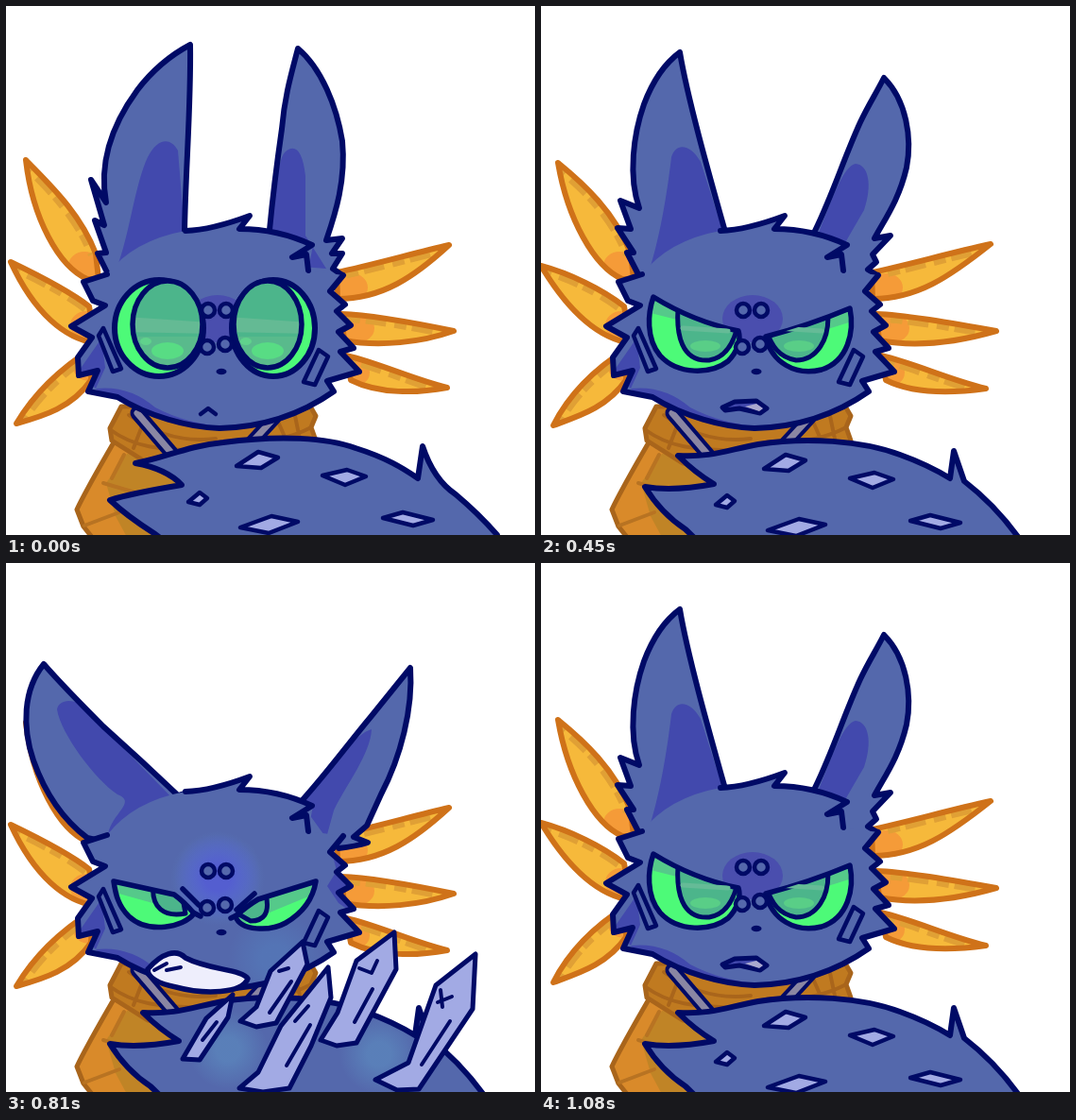
An HTML page with a canvas that plays this animation: 560x560 px, repeating every 1.26 s.

```html
<!DOCTYPE html>
<html lang="en">
<head>
<meta charset="utf-8">
<title>Crystal tail</title>
<style>
html, body { margin: 0; width: 100%; height: 100%; overflow: hidden; background: #fff; }
canvas { display: block; width: 560px; height: 560px; }
</style>
</head>
<body>
<canvas id="stage" width="560" height="560"></canvas>
<script>
const ctx = document.getElementById('stage').getContext('2d');
const NAVY = '#000a66', FUR = '#5468ac', INNER = '#4249ad', GREEN = '#4dfa78',
  LENS = '#4cb58b', CRYSTAL = '#a2aae4', TEETH = '#eeeefc',
  GOLD = '#f6b93b', RUST = '#cf7219', SCARF = '#d98a2a', COLLAR = '#c07a20', THREAD = '#a9651b';

ctx.lineJoin = 'round';
ctx.lineCap = 'round';

function shape(d, fill, stroke, width = 6) {
  const p = new Path2D(d);
  if (fill) { ctx.fillStyle = fill; ctx.fill(p); }
  if (stroke) { ctx.strokeStyle = stroke; ctx.lineWidth = width; ctx.stroke(p); }
}
const line = (d, width = 6, color = NAVY) => shape(d, null, color, width);

function oval(x, y, rx, ry, fill, width) {
  ctx.beginPath();
  ctx.ellipse(x, y, rx, ry, 0, 0, 7);
  if (fill) { ctx.fillStyle = fill; ctx.fill(); }
  if (width) { ctx.strokeStyle = NAVY; ctx.lineWidth = width; ctx.stroke(); }
}
function clipped(d, draw) {
  ctx.save();
  ctx.clip(new Path2D(d));
  draw();
  ctx.restore();
}
function glow(x, y, r, rgb, alpha) {
  const g = ctx.createRadialGradient(x, y, r * .3, x, y, r);
  g.addColorStop(0, `rgba(${rgb},${alpha})`);
  g.addColorStop(1, `rgba(${rgb},0)`);
  oval(x, y, r, r, g);
}

// Each fin: two tip positions, upper edge, base and lower edge, glowing root.
const fins = [
  { tips: ['21 163', '18 166'], top: 'C45 188 78 218 95 262', low: 'L98 289 86 289 C56 276 28 225', root: [83, 275] },
  { tips: ['5 271', '0 275'], top: 'C30 283 65 300 88 318', low: 'L95 357 C62 352 30 325', root: [85, 338] },
  { tips: ['11 442', '13 444'], top: 'C30 410 60 382 92 362', low: 'L90 396 C70 425 40 434', root: [88, 382] },
  { tips: ['469 253', '476 252'], top: 'C430 262 385 275 350 282', low: 'L351 310 C398 310 432 287', root: [366, 298] },
  { tips: ['474 344', '482 344'], top: 'C430 335 385 327 355 326', low: 'L358 354 C395 361 440 356', root: [373, 341] },
  { tips: ['467 404', '471 405'], top: 'C430 395 395 378 360 370', low: 'L365 396 C395 411 435 410', root: [368, 388] }
];
function drawFins(variant, dy) {
  ctx.save();
  ctx.translate(0, dy);
  for (const { tips, top, low, root } of fins) {
    const tip = tips[variant], edge = `M${tip} ${top}`, d = `${edge} ${low} ${tip}Z`;
    shape(d, GOLD);
    clipped(d, () => {
      oval(...root, 17, 15, '#f59b38');
      ctx.setLineDash([13, 9, 22, 6]);
      ctx.lineCap = 'butt';
      line(edge, 17, '#e0a035');
      ctx.setLineDash([]);
    });
    ctx.lineCap = 'round';
    line(d, 6, RUST);
  }
  ctx.restore();
}

function drawScarf() {
  shape('M114 462 C98 490 85 512 75 533 L82 551 94 566 H190 V470Z', SCARF, THREAD, 5);
  shape('M128 474 L106 505 116 540 130 566 H190 V480Z', '#c08426');
  line('M103 505 L140 516 M83 550 L120 536 M125 475 L112 500', 4, '#b87322');
  shape('M122 424 L110 447 112 460 150 484 220 490 310 476 328 460 323 446 328 434 321 422 Z', COLLAR, THREAD, 5);
  line('M111 449 C145 474 185 468 220 472 M130 433 C160 455 190 462 222 458 M323 446 Q290 464 240 461 ' +
    'M306 434 L313 468 M288 440 L302 472 M145 442 L135 468', 4, THREAD);
  for (const d of ['M139 431 L181 480', 'M284 436 L250 473']) {
    line(d, 15);
    line(d, 7, '#8a86a3');
  }
}

const CALM_TAIL = 'M137 484 C170 478 190 466 230 462 C290 454 340 457 370 468 C402 478 420 489 436 500 ' +
  'L441 466 C448 487 458 505 476 517 C495 533 507 545 520 560 V580 H185 L158 559 Q128 540 110 523 ' +
  'Q132 516 186 507 Q170 490 137 484Z';
const TENSE_TAIL = 'M145 476 C180 478 197 470 230 464 C280 456 340 460 380 475 C405 484 420 492 433 500 ' +
  'L437 471 448 503 C470 520 489 540 505 562 V580 H180 L153 554 Q127 537 110 509 Q140 514 183 506 Q163 494 145 476Z';
const CALM_EARS = {
  left: 'M108 284 L97 262 106 261 94 227 104 232 90 184 106 208 C98 165 112 126 139 89 C158 64 178 50 195 41 C196 105 190 175 189 238',
  leftInner: 'M117 278 C131 242 136 190 150 160 C160 140 174 138 182 153 L190 250Z',
  right: 'M279 237 C283 195 287 165 292 130 C295 95 302 72 309 45 C334 66 350 106 356 143 C360 184 349 219 339 248 L356 246 345 262 356 262 346 278 356 285',
  rightInner: 'M279 240 C285 205 287 164 295 155 C306 145 314 153 317 180 L317 243 339 278 300 275Z'
};
const spots = [
  'M244 487 L267 472 288 478 270 489Z', 'M335 497 L361 491 381 498 359 507Z',
  'M193 525 L205 515 213 521 205 528Z', 'M248 552 L281 540 309 546 278 558Z',
  'M399 542 L420 536 452 544 431 550Z'
];

const poses = {
  calm: { dy: 0, ears: CALM_EARS, face: goggles, tail: CALM_TAIL, spotShift: [0, 0] },
  lifted: { dy: 1, ears: CALM_EARS, earShift: [1, -2], face: goggles, tail: CALM_TAIL, spotShift: [2, 0] },
  wary: {
    dy: 0, face: glare, tail: TENSE_TAIL, spotShift: [-8, 3],
    ears: {
      left: 'M106 290 L91 261 98 261 81 235 95 236 84 206 104 214 C92 180 98 135 109 104 C118 80 132 60 147 49 C155 97 177 175 195 239',
      leftInner: 'M115 279 C127 240 134 194 138 160 C143 143 159 147 169 165 L196 250Z',
      right: 'M290 238 C309 199 321 160 338 123 C347 104 355 92 363 76 C387 100 393 140 387 171 C379 205 365 224 353 246 L370 243 351 263 355 271 346 279 356 285',
      rightInner: 'M294 240 C310 200 320 170 333 167 C347 168 351 190 342 216 L320 254 300 255Z'
    }
  },
  snarl: {
    dy: 2, face: snarl, glows: [[375, 512], [267, 523], [190, 490]], finDy: 3,
    tail: 'M144 468 C180 476 220 469 250 467 C300 463 340 467 370 476 C397 482 410 490 418 499 L422 484 435 507 478 562 V580 H150 L135 535 151 512 Q138 491 144 468Z',
    crystals: [
      ['M230 495 L236 455 252 441 260 460 258 495Z', 'M241 474 L252 462 M246 486 L249 478'],
      ['M327 511 L335 472 364 440 366 466 351 513Z', 'M344 481 L355 469 M339 503 L344 487'],
      ['M174 530 L186 505 207 492 200 510 187 535Z', 'M184 521 L191 511'],
      ['M235 558 L249 529 281 508 277 533 265 562Z', 'M254 541 L264 531 M258 558 L263 546'],
      ['M384 562 L411 519 460 467 447 507 418 562Z', 'M420 526 L430 514 M409 557 L425 535']
    ],
    holes: [[246, 496, 25], [340, 516, 28]],
    ears: {
      left: 'M106 290 L91 270 108 266 83 248 97 246 C78 225 66 195 60 170 C54 136 58 99 72 76 C95 105 128 146 155 180 C175 204 186 224 200 240',
      leftInner: 'M114 278 C133 264 140 245 130 220 C118 190 103 165 107 152 C114 142 133 166 148 183 L199 250Z',
      right: 'M305 243 C326 213 350 177 372 148 C386 129 396 114 408 97 C428 123 430 156 422 183 C414 217 391 252 370 278 L382 279 365 291 352 294',
      rightInner: 'M307 245 C330 210 350 185 363 184 C362 210 343 254 326 274Z'
    }
  },
  rage: {
    dy: 4, face: rage, glows: [[395, 520], [235, 515]], finDy: 6, tail: TENSE_TAIL,
    shade() {
      shape('M344 298 L380 300 V375 L352 356 340 338 350 322Z', INNER);
      glow(285, 415, 50, '84,128,190', .5);
    },
    crystals: [
      ['M248 485 L265 470 280 432 314 401 319 425 286 487 265 491Z', 'M289 432 L299 429 M279 476 L302 443'],
      ['M333 505 L351 476 371 421 411 391 413 430 371 508 350 511Z', 'M374 429 L387 434 393 421 M369 486 L388 451'],
      ['M187 525 L212 482 240 457 235 481 205 526Z', 'M208 505 L223 486'],
      ['M247 556 L267 539 291 490 341 428 344 460 323 511 300 556 272 560Z', 'M306 485 L320 469 M297 532 L322 489'],
      ['M391 547 L426 529 455 447 497 414 494 472 437 557 414 558Z', 'M460 452 L462 470 M457 465 L472 459 M440 531 L470 485']
    ],
    holes: [],
    ears: {
      left: 'M104 295 L86 291 C58 270 40 240 29 209 C17 174 18 134 40 107 C60 130 81 151 103 173 C131 198 159 224 182 246 L192 243',
      leftInner: 'M108 287 C112 265 139 253 118 245 C95 230 58 181 54 155 C56 143 78 140 95 166 L182 255Z',
      right: 'M312 253 C340 222 361 193 386 163 L428 111 C431 154 418 205 397 245 L382 278 368 290 383 296 Q370 300 352 302',
      rightInner: 'M313 255 C340 220 370 180 387 176 C386 202 360 235 347 262 L339 291Z'
    }
  }
};

function drawEars({ ears, earShift = [0, 0] }) {
  const closing = { left: 'Z', right: ' L318 282Z' };
  ctx.save();
  ctx.translate(...earShift);
  for (const side of ['left', 'right']) {
    const area = ears[side] + closing[side];
    shape(area, FUR);
    clipped(area, () => shape(ears[side + 'Inner'], INNER));
    line(ears[side]);
  }
  ctx.restore();
}

const HAIR = 'M190 238 Q218 237 258 222 L247 236 Q288 236 324 253 L303 266 318 263 320 280';
const JAW = 'M107 284 L82 292 92 312 105 317 69 339 91 351 76 372 77 391 97 386 87 408 118 414 ' +
  'C150 434 193 446 226 447 C270 446 310 434 347 408 L340 397 374 387 354 366 368 362 352 345 365 338 350 323 359 316 343 302 357 285';
const HEAD = JAW + ' L320 280 325 253 Q288 236 247 236 L258 222 Q218 237 190 238 Q135 248 107 284Z';

function drawHead(pose) {
  shape(HEAD, FUR);
  clipped(HEAD, () => {
    shape('M78 385 L101 352 105 383 95 405Z M95 405 Q130 401 158 425 Q190 442 235 446 L140 450Z', INNER);
    if (pose.shade) pose.shade();
  });
  line(JAW);
  line(HAIR);
  shape('M103 341 L122 384 113 387 98 349Z', FUR, NAVY, 4.5);
  shape('M331 364 L341 371 327 401 315 398Z', FUR, NAVY, 4.5);
  if (pose.glows) glow(224, 330, 50, '92,130,200', .75);
  if (pose.shade) glow(224, 329, 46, '84,94,208', 1);
  else oval(224, 331, 32, 25, '#4a4eae');
  pose.face();
  for (const [x, y] of [[214, 322], [233, 322], [213, 361], [232, 358]]) oval(x, y, 7, 7, FUR, 4.5);
  oval(228, 387, 5.5, 3.2, NAVY);
}

function lensShade(x) {
  ctx.fillStyle = 'rgba(125,190,158,.48)';
  ctx.beginPath();
  ctx.moveTo(x - 44, 329);
  ctx.lineTo(x + 44, 335);
  ctx.lineTo(x + 44, 347);
  ctx.lineTo(x - 44, 345);
  ctx.fill();
  ctx.fillStyle = 'rgba(104,190,140,.45)';
  ctx.fillRect(x - 44, 350, 88, 50);
  oval(x, 365, 17, 9, '#58dc84');
  oval(x - 23, 355, 6, 4, '#60d28c');
}
function goggles() {
  for (const [x, rx, lensX, lensR] of [[162, 47, 171, 37], [283, 44, 277, 36]]) {
    oval(x, 341, rx, 51, GREEN, 6);
    ctx.save();
    ctx.beginPath();
    ctx.ellipse(lensX, 337, lensR, 46, 0, 0, 7);
    ctx.clip();
    oval(lensX, 337, lensR, 46, LENS);
    lensShade(lensX);
    ctx.restore();
    oval(lensX, 337, lensR, 46, null, 5.5);
  }
  line('M206 432 L214 426 222 432', 4.5);
}

function eye(outline, iris, shadow) {
  shape(outline, GREEN);
  clipped(outline, () => {
    shape(shadow, '#55c98a');
    shape(iris, LENS, NAVY, 5);
  });
  line(outline, 5.5);
}
function glare() {
  const left = 'M119 308 Q161 334 209 344 C212 353 208 366 198 376 C180 390 145 391 126 370 C111 352 113 325 119 308Z';
  const right = 'M238 350 Q284 338 327 320 C332 345 325 376 297 385 C269 392 244 377 238 350Z';
  eye(left, 'M146 310 C141 350 150 377 178 375 C197 372 205 355 209 335Z', 'M110 300 L215 340 V350 L112 324Z');
  eye(right, 'M303 318 C308 355 290 375 270 375 C252 372 244 360 238 342Z', 'M235 343 L335 315 V332 L240 362Z');
  for (const [d, x] of [[left, 174], [right, 273]]) clipped(d, () => {
    line(`M${x - 24} 341 L${x + 24} 344`, 5, '#65bb97');
    oval(x, 360, 16, 6, '#59ce87');
  });
  shape('M192 425 L205 419 228 418 239 426 232 431 210 426 195 428Z', INNER, NAVY, 5);
  shape('M216 424 L228 421 235 426 231 429Z', '#aaa9cf');
}
function snarl() {
  eye('M117 338 L180 350 201 360 C203 369 197 378 185 384 C150 398 118 372 117 338Z',
    'M160 338 C157 366 166 376 181 374 C192 372 197 365 200 353Z', 'M115 335 L180 345 205 357 V365 L120 352Z');
  eye('M327 343 L266 356 244 366 C252 388 278 392 297 384 C317 376 326 360 327 343Z',
    'M277 346 C280 369 272 376 261 375 L240 362Z', 'M240 360 L330 337 V354 L250 375Z');
  line('M199 359 L206 362 M246 365 L240 368 M178 343 L194 354 M269 346 L249 358', 5.5);
  shape('M152 427 L163 415 200 417 238 424 Q245 434 241 444 L205 438 160 431Z', TEETH, NAVY, 5.5);
  line('M160 426 L166 422 171 431 184 421 193 431', 4);
}
function rage() {
  eye('M114 333 L178 347 Q189 355 199 367 C188 382 150 389 130 370 C119 359 116 347 114 333Z',
    'M156 335 C153 362 168 371 190 367 L186 345Z', 'M112 330 L178 343 200 363 184 364 116 345Z');
  eye('M328 333 L267 352 Q255 359 243 370 C248 386 280 386 296 377 C315 366 325 351 328 333Z',
    'M275 346 C280 368 272 375 259 375 L243 366Z', 'M240 368 L330 330 V345 L250 378Z');
  line('M198 366 L206 370 M244 369 L238 372 M187 341 L204 358 M263 346 L244 363', 5.5);
  shape('M150 426 C165 409 180 404 190 414 C215 427 250 426 256 436 C250 452 210 453 180 445 C165 442 150 437 150 426Z', TEETH, NAVY, 5.5);
  line('M157 427 L170 420 M170 427 L185 424', 4);
}

function drawTail(pose) {
  shape(pose.tail, FUR);
  clipped(pose.tail, () => (pose.glows || []).forEach(([x, y]) => glow(x, y, 42, '96,155,200', .45)));
  line(pose.tail);
  if (pose.crystals) {
    for (const [x, y, r] of pose.holes) oval(x, y, r, 6, INNER, 4);
    for (const [d, cracks] of pose.crystals) {
      shape(d, CRYSTAL, NAVY, 5);
      line(cracks, 4);
    }
  } else {
    ctx.save();
    ctx.translate(...pose.spotShift);
    spots.forEach(d => shape(d, CRYSTAL, NAVY, 4.5));
    ctx.restore();
  }
}

// Start time, pose, fin variant.
const timeline = [
  [0, 'calm', 0], [180, 'lifted', 1], [360, 'calm', 0], [450, 'wary', 1], [540, 'snarl', 0],
  [720, 'rage', 1], [810, 'rage', 0], [900, 'rage', 1], [990, 'snarl', 0], [1080, 'wary', 1]
];
const LOOP = 1260;

function render(now) {
  const t = now % LOOP;
  const [, name, variant] = timeline.filter(([start]) => start <= t).pop();
  const pose = poses[name];
  ctx.fillStyle = '#fff';
  ctx.fillRect(0, 0, 560, 560);
  drawFins(variant, pose.finDy || 0);
  drawScarf();
  drawEars(pose);
  ctx.save();
  ctx.translate(0, pose.dy);
  drawHead(pose);
  ctx.restore();
  drawTail(pose);
}

const begin = performance.now();
function tick() {
  render(performance.now() - begin);
  requestAnimationFrame(tick);
}
tick();
</script>
</body>
</html>
```
